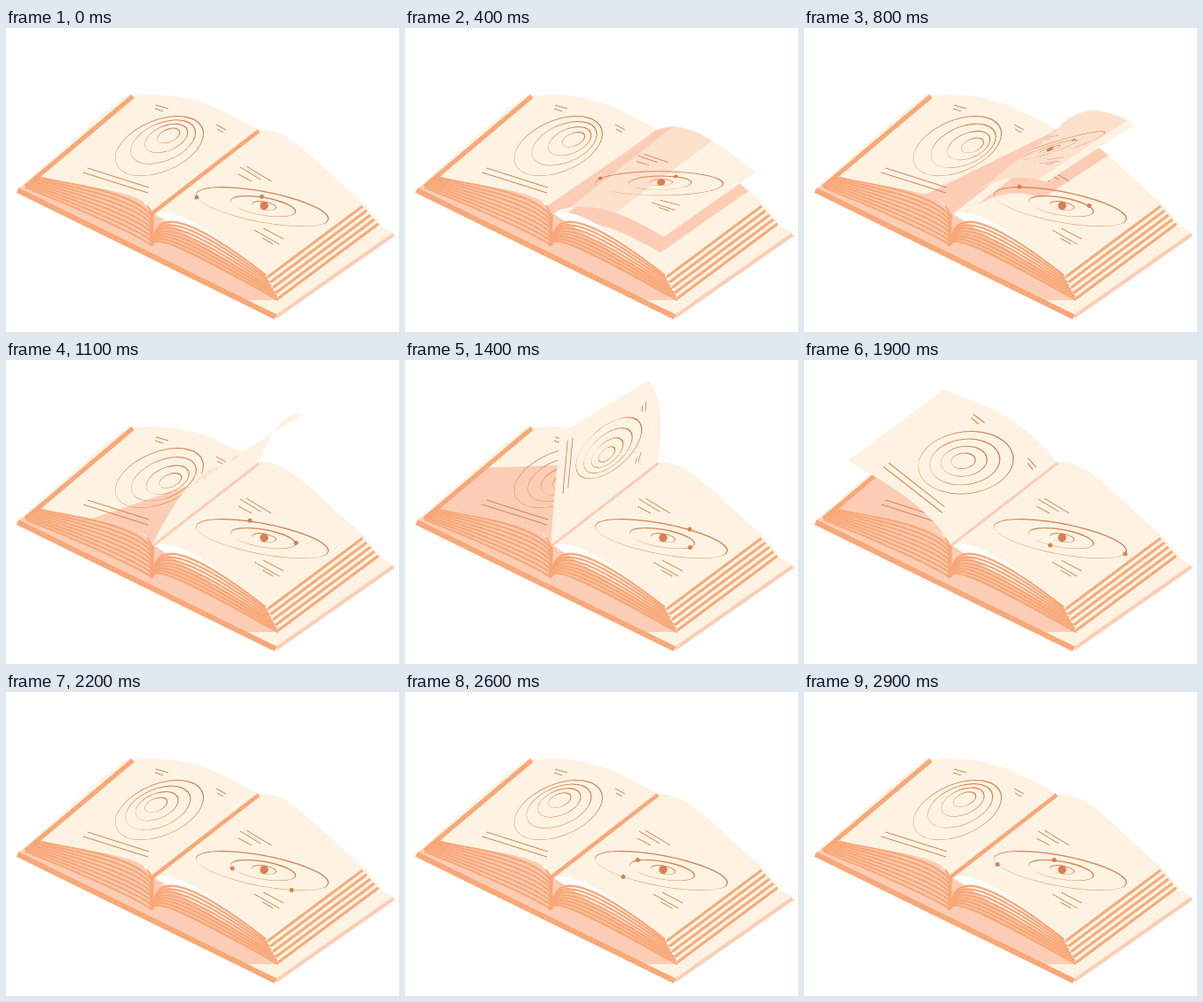
An HTML page with a canvas that plays this animation: 443x343 px, repeating every 3 s.

```html
<!DOCTYPE html>
<html lang="en">
<head>
<meta charset="utf-8">
<title>Turning page</title>
<style>
  html, body { margin: 0; width: 443px; height: 343px; overflow: hidden; background: #fff; }
  canvas { display: block; }
</style>
</head>
<body>
<canvas id="stage" width="443" height="343"></canvas>
<script>
const ctx = document.getElementById('stage').getContext('2d');
const CREAM = '#fef3e2', PEACH = '#fccdb4', LIGHT = '#fce1cd', ORANGE = '#f8a878', INK = '#d88150';
const LOOP = 3, LANDED = 2.1;
const FOOT = [165, 208], HEAD = [285, 115];
const LEFT_NEAR = [36, 167], LEFT_FAR = [145, 76], RIGHT_NEAR = [295, 278], RIGHT_FAR = [403, 198];

const clamp = v => Math.min(1, Math.max(0, v));
const mix = (a, b, f) => a.map((v, n) => v + (b[n] - v) * f);
const turn = t => 2 * Math.PI * t / LOOP;

function poly(color, ...points) {
  trace(points);
  ctx.closePath();
  ctx.fillStyle = color;
  ctx.fill();
}
function trace(points) {
  ctx.beginPath();
  points.forEach(p => ctx.lineTo(...p));
}
function stroke(color, width) {
  ctx.strokeStyle = color;
  ctx.lineWidth = width;
  ctx.stroke();
}
function line(color, width, ...points) {
  trace(points);
  stroke(color, width);
}
function curve(color, width, a, ...rest) {
  ctx.beginPath();
  ctx.moveTo(...a);
  ctx.bezierCurveTo(...rest.flat());
  stroke(color, width);
}
function clipped(points, draw) {
  ctx.save();
  trace(points);
  ctx.clip();
  draw();
  ctx.restore();
}

const bezier = (a, b, c, d, u) => mix(
  mix(mix(a, b, u), mix(b, c, u), u), mix(mix(b, c, u), mix(c, d, u), u), u);

// The sheet's angle goes from 0 (right) to PI (left), slowly at first.
// Each control point swings over with it: lift at the middle, curl on the way.
function sheet(t) {
  const s = clamp(t / LANDED), angle = Math.PI * (.35 * s + .65 * s ** 2.5);
  const swing = (from, to, lift, curl) => mix(from, to, (1 - Math.cos(angle)) / 2)
    .map((v, n) => v + lift[n] * Math.sin(angle) + curl[n] * Math.sin(2 * angle));

  const near = swing(RIGHT_NEAR, LEFT_NEAR, [-5, -142], [4, -15]);
  const far = swing(RIGHT_FAR, LEFT_FAR, [-13, -118], [0, -12]);
  const near1 = swing([205, 204], [155, 185], [-18, -30], [5, -4]);
  const near2 = swing([230, 232], [120, 185], [-8, -100], [12, -15]);
  const far1 = swing([318, 112], [220, 78], [20, -22], [-15, -6]);
  const far2 = swing([345, 148], [195, 73], [15, -72], [-10, -18]);

  const bottom = u => bezier(FOOT, near1, near2, near, u);
  const top = u => bezier(HEAD, far1, far2, far, u);
  const mid = u => mix(bottom(u), top(u), .5);
  const strip = (from, to) => {
    const us = Array.from({ length: 25 }, (_, i) => from + (to - from) * i / 24);
    return [...us.map(bottom), ...us.reverse().map(top)];
  };
  const [q, r, b, c] = [mid(.3), mid(1), bottom(.6), top(.6)];
  const frame = new DOMMatrix([r[0] - q[0], r[1] - q[1], c[0] - b[0], c[1] - b[1], ...mid(.6)]);
  const faceUp = (near[0] - FOOT[0]) * (FOOT[1] - HEAD[1]) + (near[1] - FOOT[1]) * (HEAD[0] - FOOT[0]) > 0;
  return { strip, frame, faceUp, outline: strip(0, 1) };
}
const RIGHT = sheet(0), LEFT = sheet(LANDED);

// Ring of uneven thickness: x = a cos, y = k cos + b sin
function ring(x, y, a, k, b, thick = .75) {
  ctx.beginPath();
  const oval = (dx, dy, less) => {
    const s = 1 - less / a;
    ctx.save();
    ctx.transform(a * s, k * s, 0, b - less, x + dx, y + dy);
    ctx.moveTo(1, 0);
    ctx.arc(0, 0, 1, 0, 7);
    ctx.restore();
  };
  oval(0, 0, 0);
  oval(-thick * .5, thick * .4, thick);
  ctx.fillStyle = INK;
  ctx.fill('evenodd');
}
function dot(x, y, r) {
  ctx.beginPath();
  ctx.arc(x, y, r, 0, 7);
  ctx.fillStyle = INK;
  ctx.fill();
}
const dash = (x, y, dx, dy) => line(INK, 1, [x, y], [x + dx, y + dy]);

function ringDrawing(t) {
  const a = turn(t) - 1.25, dx = 7 + 11 * Math.cos(a), dy = -4 + 8 * Math.sin(a);
  for (const [size, drift] of [[1, 0], [.74, .4], [.49, .75], [.26, 1]])
    ring(173 + dx * drift, 133 + dy * drift, 50 * size, -14 * size, 31 * size, .75);
  dash(169, 87, 14, 4);
  dash(168, 91, 9, 3);
  dash(237, 109, 11, 6);
  dash(238, 114, 7, 4);
  dash(92, 158, 69, 22);
  dash(87, 163, 73, 23);
}

function orbitDrawing(t) {
  const swing = turn(t) - .38 - .42 * Math.sin(turn(t) - Math.PI / 3);
  const orbit = (start, x, y, a, k, b) => {
    const q = start + swing;
    ring(x, y, a, k, b, .9);
    dot(x + a * Math.cos(q), y + k * Math.cos(q) + b * Math.sin(q), 2.5);
  };
  orbit(3, 289, 201.5, 75, 13.5, 18);
  orbit(-1.6, 290, 201, 37, 6, 10.5);
  ring(291, 200.5, 14, 2, 5, .7);
  dot(291, 200.5, 4.7);
  dash(271, 156, 28, 17);
  dash(264, 157, 23, 14);
  dash(262, 165, 15, 8);
  dash(290, 226, 23, 12);
  dash(280, 228, 28, 16);
  dash(289, 237, 12, 7);
}

function cover() {
  poly(CREAM, [12, 182], [110, 96], [138, 75], [150, 77], [60, 170], [30, 182]);
  poly(PEACH, [14, 181], [36, 167], FOOT, [308, 300], [304, 325]);
  poly(CREAM, [270, 307], [308, 307], [300, 290], [418, 220], [437, 231], [304, 323]);
  line(PEACH, 4, [304, 326], [437, 233]);
  line(ORANGE, 6, [13, 183], [304, 326]);
}

function pageBlock() {
  poly(PEACH, LEFT_NEAR, [100, 178], [150, 191], FOOT, [163, 246], [20, 181]);
  poly(CREAM, RIGHT_NEAR, RIGHT_FAR, [423, 221], [308, 307]);
  for (let i = 0; i < 8; i++) {
    const s = i / 7;
    curve(ORANGE, 2.4, [36 - 14 * s, 168 + 12 * s], [95 - 10 * s, 179 + 25 * s],
      [147 + 4 * s, 189 + 46 * s], [164, 212 + 33 * s]);
    curve(ORANGE, 2.5, [165, 244], [168, 206 + 28 * s], [200 - 6 * s, 206 + 37 * s],
      [293 + 14 * s, 279 + 28 * s]);
  }
  for (let i = 0; i < 5; i++)
    line(ORANGE, 3, [295 + 3 * i, 281 + 6 * i], [402 + 4.4 * i, 201 + 5 * i]);
  line(ORANGE, 4, [160, 199], [165, 209], [164, 246]);
}

function leftShade(t) {
  const near = mix(FOOT, LEFT_NEAR, clamp(t / 1.4) ** 2);
  const edge = mix(near, LEFT_FAR, clamp((t - 1.1) / .6));
  const ridge = mix(HEAD, LEFT_FAR, clamp((t - 1.4) / .3));
  poly(PEACH, HEAD, FOOT, near, edge, ridge);
}
function dropShade(page, t) {
  const drop = clamp(t / .4);
  poly(PEACH, ...page.outline.map(([x, y]) => [x - 4 * drop, y + 18 * drop]));
}

function turningPage(page, t) {
  poly(CREAM, ...page.outline);
  if (page.faceUp) {
    const bend = Math.min(.93, 1.6 * t);
    poly(LIGHT, ...page.strip(0, bend));
    poly(PEACH, ...page.strip(0, bend * .3));
  }
  const flat = page.faceUp ? RIGHT : LEFT;
  const m = page.frame.multiply(flat.frame.inverse());
  clipped(page.outline, () => {
    ctx.transform(m.a, m.b, m.c, m.d, m.e, m.f);
    (page.faceUp ? orbitDrawing : ringDrawing)(t);
  });
}

function render(t) {
  const turning = t > 0 && t < LANDED, page = sheet(t);
  ctx.clearRect(0, 0, 443, 343);
  cover();
  pageBlock();

  poly(CREAM, ...LEFT.outline);
  if (turning) clipped(LEFT.outline, () => leftShade(t));
  ringDrawing(t);
  line(ORANGE, 5, [143, 77], [22, 179]);

  poly(CREAM, ...RIGHT.outline);
  if (turning && page.faceUp) clipped(RIGHT.outline, () => dropShade(page, t));
  if (!turning || t > .5) orbitDrawing(t);
  line(turning ? PEACH : ORANGE, 4.5, [165, 209], [285, 116]);
  if (turning) turningPage(page, t);
}

// The motion advances in tenths of a second
const start = performance.now();
requestAnimationFrame(function tick() {
  render(Math.floor((performance.now() - start) / 100) % (LOOP * 10) / 10);
  requestAnimationFrame(tick);
});
</script>
</body>
</html>
```
